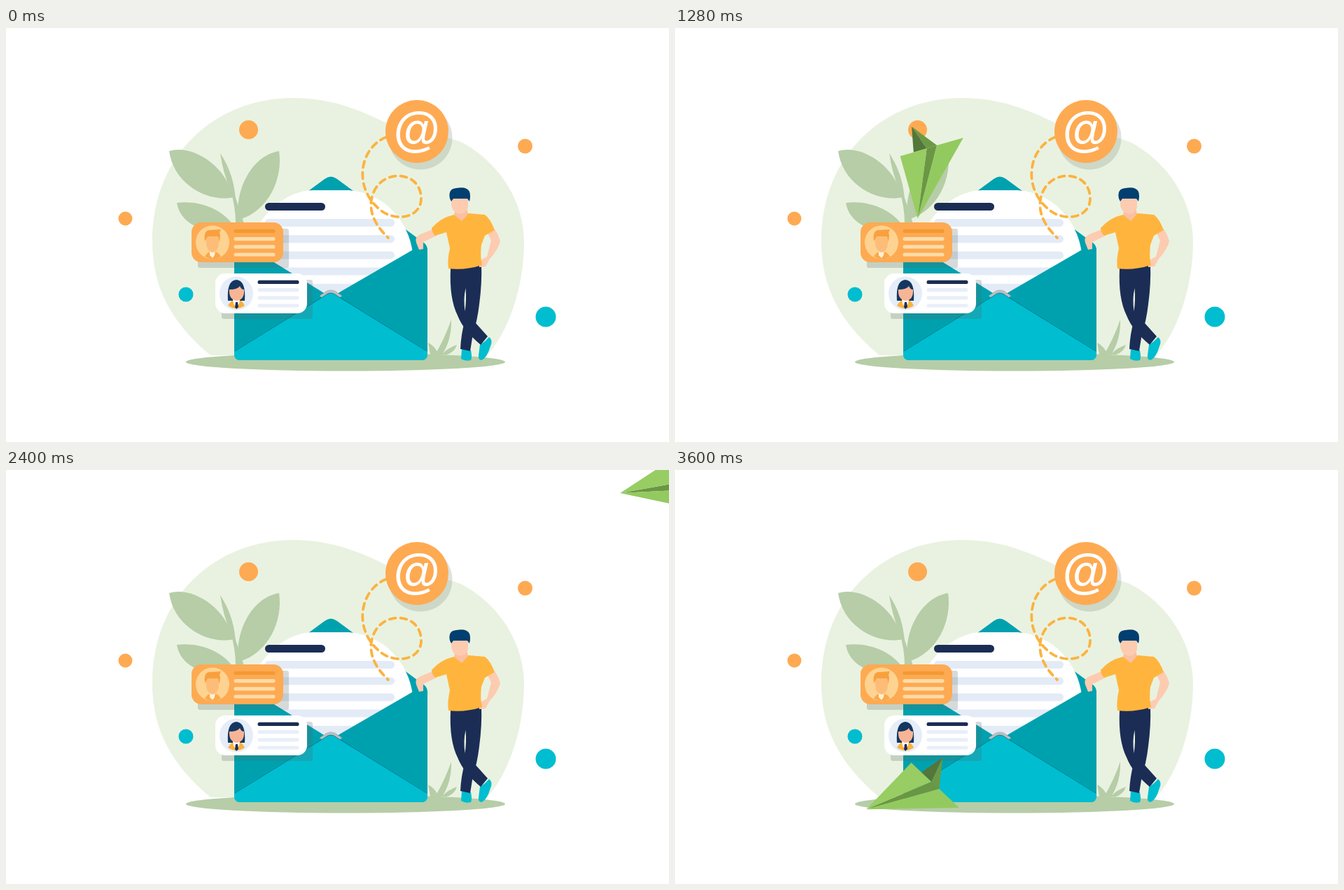
An HTML page with a canvas for the animation above (4000 ms loop, 947 by 592 pixels).

```html
<!DOCTYPE html>
<html lang="en">
<head>
<meta charset="utf-8">
<title>Paper plane mail</title>
<style>
  html, body { margin: 0; width: 100%; height: 100%; overflow: hidden; background: #fff; }
  canvas { display: block; width: 947px; height: 592px; }
</style>
</head>
<body>
<canvas id="stage" width="947" height="592"></canvas>
<script>
const LOOP = 4000, STEP = 40;
const ORANGE = '#feaa52', TEAL = '#00bdd0', DARK_TEAL = '#00a1af', NAVY = '#1b2d55',
  LEAF = '#b6cda7', PALE = '#e3ebf7', SKIN = '#fdcbb0', SHIRT = '#ffb53d',
  SHADOW = 'rgba(85,100,100,.24)';

const stage = document.getElementById('stage').getContext('2d');
const scenery = document.createElement('canvas');
scenery.width = 947;
scenery.height = 592;
let g = scenery.getContext('2d');

function shape(d, color) {
  g.fillStyle = color;
  g.fill(new Path2D(d));
}
function line(d, color, width, cap = 'round') {
  g.strokeStyle = color;
  g.lineWidth = width;
  g.lineCap = cap;
  g.stroke(new Path2D(d));
}
function oval(x, y, rx, color, ry = rx) {
  g.beginPath();
  g.ellipse(x, y, rx, ry, 0, 0, Math.PI * 2);
  g.fillStyle = color;
  g.fill();
}
function box(x, y, w, h, r, color) {
  g.beginPath();
  g.roundRect(x, y, w, h, r);
  g.fillStyle = color;
  g.fill();
}
function poly(points, color) {
  g.beginPath();
  points.forEach(p => g.lineTo(p[0], p[1]));
  g.closePath();
  g.fillStyle = color;
  g.fill();
}

function drawBackdrop() {
  g.fillStyle = '#fff';
  g.fillRect(0, 0, 947, 592);
  shape('M292 468C235 420 209 370 209 305C209 180 300 100 410 100C470 100 513 121 550 139C587 158 616 149 650 163C706 192 740 250 740 305C740 375 715 440 685 470Z', '#e9f2e0');
  oval(485, 477.5, 228, LEAF, 13);

  shape('M233 176C262 166 312 192 325 242C290 250 240 225 233 176Z', LEAF);
  shape('M390 176C396 215 375 262 333 274C325 240 347 183 390 176Z', LEAF);
  shape('M244 250C275 246 312 258 330 290C290 295 250 285 244 250Z', LEAF);
  shape('M306 179C318 198 325 215 328 243Q334 260 340 280L328 280Q328 255 320 230Q310 207 306 179Z', LEAF);
  shape('M636 417Q637 445 623 467L613 467Q627 443 636 417ZM603 450Q613 455 618 467L606 467ZM644 453Q641 463 630 467L622 467Q632 457 644 453Z', LEAF);

  oval(346.5, 145.5, 13.5, ORANGE);
  oval(741.5, 169, 10.5, ORANGE);
  oval(170.5, 272.5, 10, ORANGE);
  oval(257, 381, 10.5, TEAL);
  oval(771, 413, 14.5, TEAL);
}

function drawEnvelope() {
  shape('M326 318L326 311L455 216Q464 209 473 216L598 308Q602 311 602 320V400H326Z', DARK_TEAL);

  g.save();
  g.clip(new Path2D('M352 300C366 262 402 232 440 232H490C540 236 575 275 581 322L500 390H430L352 345Z'));
  g.fillStyle = '#fff';
  g.fillRect(340, 225, 250, 170);
  for (let i = 0; i < 5; i++) box(370, 273 + i * 23.2, 185, 11, 5.5, PALE);
  g.restore();
  box(370, 250, 86, 11, 5.5, NAVY);

  oval(464, 383, 12, '#b9bec2', 8.5);
  shape('M326 300L464 385L590 312Q602 305 602 320V466Q602 475 593 475H335Q326 475 326 466Z', DARK_TEAL);
  shape('M454 379Q464 370 474 379L480 383L464 396L448 383Z', '#b9bec2');
  shape('M326 462L455 383Q464 375 473 383L602 462V466Q602 475 593 475H335Q326 475 326 466Z', TEAL);
  line('M327 462L455 383Q464 375 473 383L601 462', 'rgba(0,85,100,.55)', 1);
}

function drawCard(x, y, color, disc, firstLine, otherLines) {
  box(x + 9, y + 9, 130, 56, 3, SHADOW);
  box(x, y, 131, 57, 14, color);
  oval(x + 30, y + 28.5, 24, disc);
  for (let i = 0; i < 4; i++)
    box(x + 60.5, y + 9.8 + i * 11.2, 59, 5.2, 2.6, i ? otherLines : firstLine);
}

function drawCards() {
  drawCard(265, 278, ORANGE, '#fed391', '#f29a32', '#ffdca8');
  shape('M284 327Q287 320 295 319Q304 320 307 327Q296 334 284 327Z', '#fba949');
  shape('M291 317H299L298 325L295 329L291 325Z', '#fff0d8');
  shape('M286 297H304V309Q303 319 295 321Q287 319 286 309Z', '#fdbd78');
  shape('M284 305Q282 290 290 289L307 288Q304 293 306 296L305 306L303 298H288Z', '#f9a03e');

  drawCard(299, 351, '#fff', '#e5edf8', NAVY, '#e8eff9');
  shape('M317 390Q315 361 329 360Q343 361 341 390Z', '#143761');
  shape('M317 397Q321 389 329 388Q338 389 341 397Q329 405 317 397Z', '#fbb13c');
  shape('M324 388H334L333 394L329 401L325 394Z', '#fff');
  shape('M328 392H331L332 399L329 402L327 399Z', NAVY);
  shape('M319 374Q331 374 334 369Q336 374 340 374Q341 389 329 390Q318 388 319 374Z', '#f8b596');
}

function drawBadge() {
  g.setLineDash([9, 7]);
  line('M543 156C505 172 497 225 530 256C553 280 594 272 593 243C592 205 540 200 525 235C514 262 530 285 546 300', '#fbb340', 3.8);
  g.setLineDash([]);

  oval(592, 157, 45.5, 'rgba(90,110,100,.2)');
  oval(587, 148, 45, ORANGE);
  g.font = 'italic bold 68px "Liberation Sans", Arial, sans-serif';
  g.fillStyle = '#fff';
  const m = g.measureText('@');
  g.fillText('@', 586.5 + (m.actualBoundingBoxLeft - m.actualBoundingBoxRight) / 2,
    149 + (m.actualBoundingBoxAscent - m.actualBoundingBoxDescent) / 2);
}

function drawPerson() {
  // Legs and shoes
  shape('M651 459L664 461Q666 471 664 475Q656 477 650 473Z', TEAL);
  shape('M684 448L690 442Q696 446 692 455Q687 472 679 475Q674 474 675 468L677 453Z', TEAL);
  shape('M635 344L660 342L658 380Q656 400 662 412L688 441L678 453Q653 432 645 411Q633 387 635 344Z', NAVY);
  shape('M655 342L679 338Q680 365 676 395Q673 420 667 437L663 462L649 459Q650 438 655 420Q657 390 655 342Z', NAVY);
  shape('M656.5 372Q658 390 655.5 405Q653 387 656.5 372Z', '#e9f2e0');

  // Arms
  shape('M609 288L592 295Q583 299 586 307L590 317L596 316L596 306L615 297Z', SKIN);
  shape('M686 289L693 304L687 327L676 333L676 342L685 341L691 330Q703 317 706 305Q703 294 698 288Z', SKIN);

  // Torso, head and cap
  shape('M640 267L661 265L684 267Q692 273 698 289L684 297L679 310Q677 327 680 339Q655 347 632 344Q630 332 634 315L629 292L613 297Q608 292 608 286Q621 271 640 267Z', SHIRT);
  shape('M642 257H658L660 266L651 276L640 267Z', '#fac0a4');
  shape('M636 240H660V256Q658 265 649 266Q637 264 636 252Z', SKIN);
  shape('M634 244Q631 230 643 229Q658 226 662 234Q664 240 662 248L659 244H639L636 248Z', '#003f70');
}

drawBackdrop();
drawEnvelope();
drawCards();
drawBadge();
drawPerson();

// Flight keys: time, centre x, centre y, heading in degrees
const OUTBOUND = [
  [320, -62, 430, 12], [580, 118, 464, -4], [840, 296, 410, -20],
  [950, 400, 362, -40], [1060, 466, 262, -90], [1170, 430, 160, -178],
  [1280, 357, 193, -262.5], [1400, 426, 314, -307], [1640, 658, 398, -355.6],
  [1960, 979, 270, -422], [2080, 1035, 180, -430]
];
const INBOUND = [
  [2400, 956, 19, 170], [2560, 728, 98, 151], [2720, 578, 229, 136],
  [2920, 462, 361, 134], [3080, 413, 406, 140], [3600, 347, 454, 157]
];

function slope(keys, i, k) {
  const a = keys[Math.max(i - 1, 0)], b = keys[Math.min(i + 1, keys.length - 1)];
  return (b[k] - a[k]) / (b[0] - a[0]);
}

// Cubic Hermite sampling; a flight that lands stops smoothly
function sample(keys, t, lands) {
  const last = keys.length - 1;
  t = Math.min(t, keys[last][0]);
  let i = 0;
  while (i < last - 1 && t > keys[i + 1][0]) i++;
  const a = keys[i], b = keys[i + 1], span = b[0] - a[0], s = (t - a[0]) / span;
  return [1, 2, 3].map(k => {
    const endSlope = lands && i + 1 === last ? 0 : slope(keys, i + 1, k);
    const startSlope = lands && i + 1 === last ? 2 * (b[k] - a[k]) / span : slope(keys, i, k);
    return a[k] * (1 + 2 * s) * (1 - s) ** 2 + b[k] * s * s * (3 - 2 * s)
      + span * s * (1 - s) * (startSlope * (1 - s) - endSlope * s);
  });
}

function drawPlane([x, y, heading]) {
  const nose = [0, 0], wide = [132.5, 0], near = [65.3, -65.6], tail = [110, -72],
    creaseA = [104.5, -27.5], creaseB = [93.4, -37.9], creaseC = [79.5, -51.6];
  g.save();
  g.translate(x, y);
  g.rotate(heading * Math.PI / 180);
  g.translate(80, 0);
  g.rotate(-158 * Math.PI / 180);
  poly([tail, creaseA, creaseB], '#6d9945');
  poly([tail, creaseB, creaseC], '#53763a');
  poly([nose, creaseA, creaseB], '#6b9644');
  poly([nose, wide, creaseA], '#93ca5f');
  poly([nose, near, creaseB], '#97cd63');
  g.restore();
}

function render(now) {
  const t = Math.floor((now % LOOP) / STEP) * STEP;
  g.drawImage(scenery, 0, 0);
  if (t >= 320 && t < 2040) drawPlane(sample(OUTBOUND, t, false));
  else if (t >= 2400) drawPlane(sample(INBOUND, t, true));
}

g = stage;
const start = performance.now();
function tick() {
  render(performance.now() - start);
  requestAnimationFrame(tick);
}
tick();
</script>
</body>
</html>
```
